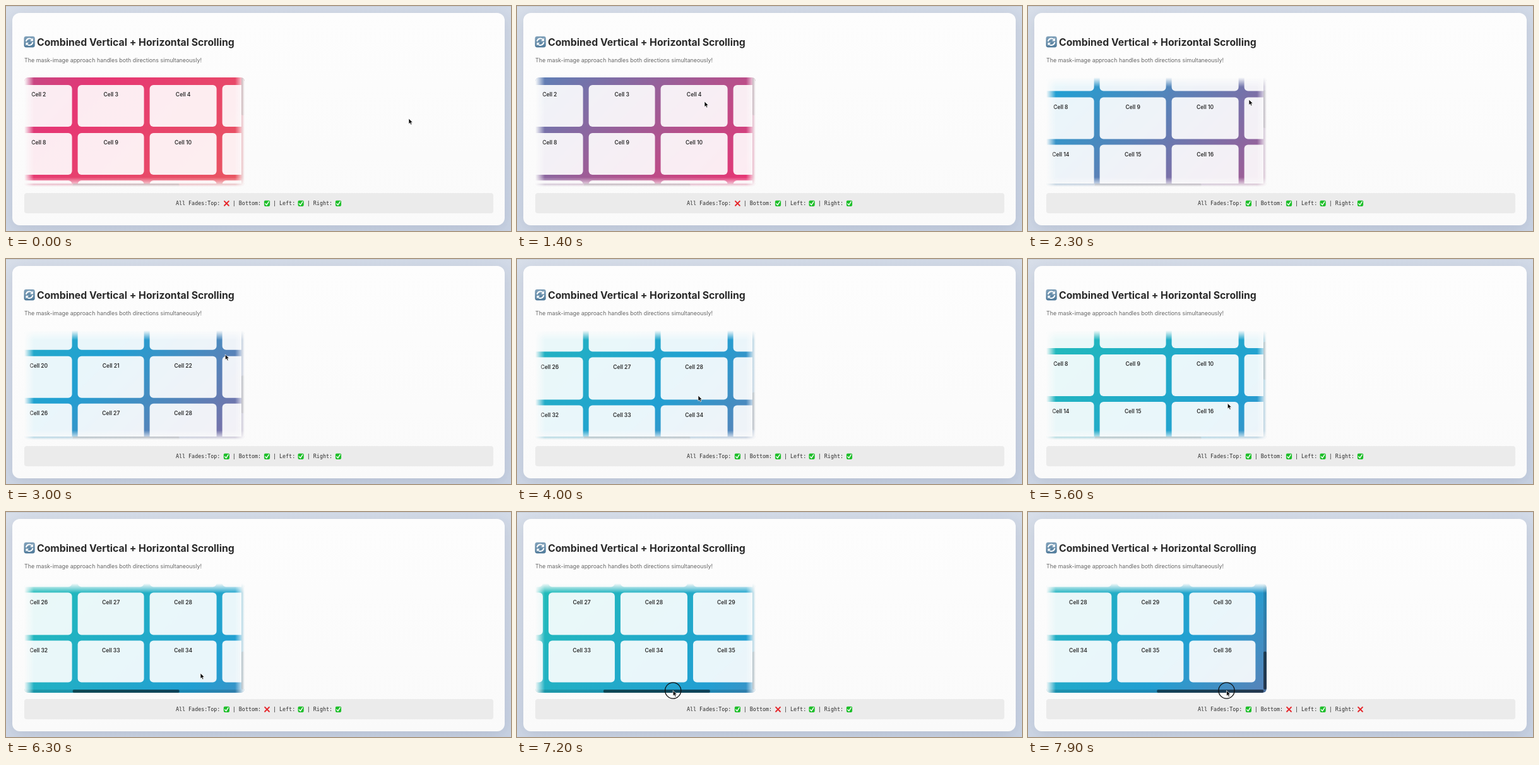
An HTML page for the animation above (8 s loop, 800 px wide and 356 px high).

```html
<!DOCTYPE html>
<html lang="en">
<head>
<meta charset="utf-8">
<title>Combined scrolling</title>
<style>
html, body { margin: 0; width: 100%; height: 100%; overflow: hidden; }
body { background: #d0d8e5; }
#stage {
  position: relative; width: 800px; height: 356px; overflow: hidden;
  background: linear-gradient(165deg, #d8dfea, #c9d3e4);
}
#stage > *, #view * { position: absolute; }
.rule { left: 0; top: 0; width: 800px; height: 1px; background: #c6cdd9; }
.card {
  left: 10px; top: 11px; width: 780px; height: 336px; border-radius: 12px;
  background: linear-gradient(#fdfdfd, #fafafa);
  box-shadow: 0 6px 24px rgba(40, 50, 80, .13);
}
.status {
  left: 28.5px; top: 296.3px; width: 743px; height: 31.7px;
  border-radius: 4px; background: #ebebeb;
}
#view {
  left: 29px; top: 112.5px; width: 349px; height: 173.5px;
  overflow: hidden; border-radius: 6px;
  background: linear-gradient(-45deg, #ec7150, #e63674, #229fd2, #21d0a9);
  background-size: 400% 400%;
  --l: 0; --r: 0; --t: 0; --b: 0;
  -webkit-mask-image:
    linear-gradient(to right, rgba(0,0,0,var(--l)), #000 15px, #000 calc(100% - 15px), rgba(0,0,0,var(--r))),
    linear-gradient(to bottom, rgba(0,0,0,var(--t)), #000 15px, #000 calc(100% - 15px), rgba(0,0,0,var(--b)));
  -webkit-mask-composite: source-in;
  mask-image:
    linear-gradient(to right, rgba(0,0,0,var(--l)), #000 15px, #000 calc(100% - 15px), rgba(0,0,0,var(--r))),
    linear-gradient(to bottom, rgba(0,0,0,var(--t)), #000 15px, #000 calc(100% - 15px), rgba(0,0,0,var(--b)));
  mask-composite: intersect;
}
.port { left: 0; top: 0; width: 344px; height: 168.5px; overflow: hidden; }
#grid { left: 0; top: 0; width: 702px; height: 468px; }
.cell {
  width: 105.3px; height: 66.2px; border-radius: 6px;
  background: rgba(255, 255, 255, .9); color: #2d2d2d;
  font: 600 8.5px/30px Inter, Roboto, sans-serif; text-align: center;
}
.track { background: rgba(0, 0, 0, .14); }
.thumb { background: rgba(0, 0, 0, .5); border-radius: 2px; }
#tx { left: 0; top: 168.5px; width: 349px; height: 5px; }
#ty { left: 344px; top: 0; width: 5px; height: 168.5px; }
#hx { left: 0; top: 168.5px; width: 168.6px; height: 5px; }
#hy { left: 344px; top: 0; width: 5px; height: 60.7px; }
svg { left: 0; top: 0; }
.title { font: 700 15.8px Inter, Roboto, sans-serif; fill: #2a2a2a; }
.sub { font: 400 8.9px Inter, Roboto, sans-serif; fill: #666; }
.mono { font: 8.36px "DejaVu Sans Mono", "Liberation Mono", monospace; fill: #2b2b2b; }
</style>
</head>
<body>
<div id="stage">
  <div class="rule"></div>
  <div class="card"></div>
  <div class="status"></div>
  <div id="view">
    <div class="port"><div id="grid"></div></div>
    <div class="track" id="tx"></div>
    <div class="track" id="ty"></div>
    <div class="thumb" id="hx"></div>
    <div class="thumb" id="hy"></div>
  </div>
  <svg width="800" height="356" viewBox="0 0 800 356">
    <defs>
      <linearGradient id="tile" x2="0" y2="1">
        <stop stop-color="#83a3bb"/><stop offset="1" stop-color="#4d7899"/>
      </linearGradient>
      <g id="yes">
        <rect x=".1" y=".1" width="9.2" height="9.2" rx="1.8" fill="#1fbf2b"/>
        <path d="M2 5.1 4 7.3 7.4 2" fill="none" stroke="#fff" stroke-width="1.4" stroke-linecap="round" stroke-linejoin="round"/>
      </g>
      <path id="no" d="M1.3 1.3 8.1 8.1M8.1 1.3 1.3 8.1" fill="none" stroke="#e6262b" stroke-width="2" stroke-linecap="round"/>
    </defs>
    <g transform="translate(28.5 48)">
      <rect width="17.2" height="17.4" rx="3.4" fill="url(#tile)"/>
      <g fill="none" stroke="#fff" stroke-width="1.9">
        <path d="M3.3 8.2A5.4 5.4 0 0 1 12.3 4.8"/>
        <path d="M13.9 9.2A5.4 5.4 0 0 1 4.9 12.6"/>
      </g>
      <path d="M14.4 2.6V7.4H9.6ZM2.8 14.8V10H7.6Z" fill="#fff"/>
    </g>
    <text class="title" x="49" y="63">Combined Vertical + Horizontal Scrolling</text>
    <text class="sub" x="29" y="89.4">The mask-image approach handles both directions simultaneously!</text>
    <g id="flags"></g>
    <g id="cursor">
      <circle id="ring" r="12.6" cx="0" cy="0" fill="none" stroke="#111" stroke-width="1.3"/>
      <path d="M0 0V8.6L2 6.9 3.4 10 5 9.3 3.6 6.3H6.3Z" fill="#080808" stroke="#fff" stroke-width=".7" stroke-linejoin="round"/>
    </g>
  </svg>
</div>
<script>
const LOOP = 8000, STEP = 100;
const MAX_X = 357.6, MAX_Y = 299.4;
const $ = id => document.getElementById(id);

// Rows of [time, values...]
const scrollY = [[2000, 0], [2300, 56.5], [3500, MAX_Y], [3850, MAX_Y], [4000, 271.5],
  [5100, 47.5], [5300, 0], [5500, 0], [6100, MAX_Y]];
const scrollX = [[6900, 156.4], [7700, MAX_X]];
const pointer = [[100, 638, 178], [1000, 297, 151], [1500, 297, 151], [2100, 350, 148],
  [2900, 350, 148], [3700, 287, 216], [4100, 287, 216], [4800, 320, 216], [5300, 320, 216],
  [6100, 308, 255], [6300, 308, 255], [6800, 216, 282.5], [6900, 216, 282.5], [7700, 314.5, 282.5]];
const press = { from: 6800, to: 8000 };

const linear = u => u;
const smooth = u => u * u * (3 - 2 * u);

function at(rows, t, ease = linear) {
  if (t <= rows[0][0]) return rows[0].slice(1);
  const i = rows.findIndex(r => r[0] > t);
  if (i < 0) return rows[rows.length - 1].slice(1);
  const a = rows[i - 1], b = rows[i];
  const u = ease((t - a[0]) / (b[0] - a[0]));
  return a.slice(1).map((v, k) => v + (b[k + 1] - v) * u);
}

for (let i = 0; i < 36; i++) {
  const cell = document.createElement('div');
  cell.className = 'cell';
  cell.textContent = `Cell ${i + 1}`;
  cell.style.left = 12.2 + 114.4 * (i % 6) + 'px';
  cell.style.top = 12.5 + 75.6 * Math.floor(i / 6) + 'px';
  $('grid').append(cell);
}

function svg(tag, attrs, text = '') {
  const el = document.createElementNS('http://www.w3.org/2000/svg', tag);
  for (const key in attrs) el.setAttribute(key, attrs[key]);
  el.textContent = text;
  $('flags').append(el);
  return el;
}

const flags = [
  ['t', 269, 'All Fades:Top:', 344.7], ['b', 358.8, '| Bottom:', 408.8],
  ['l', 423, '| Left:', 462.4], ['r', 476.8, '| Right:', 521.8],
].map(([side, x, label, iconX]) => {
  svg('text', { class: 'mono', x, y: 315.2 }, label);
  return { side, icon: svg('use', { x: iconX, y: 307.6 }) };
});

const drift = $('view').animate([
  { backgroundPosition: '100% 50%', easing: 'ease' },
  { backgroundPosition: '0% 50%', easing: 'ease' },
  { backgroundPosition: '100% 50%' },
], { duration: 15000, iterations: Infinity });
drift.pause();

function draw(t) {
  const [sx] = at(scrollX, t, smooth), [sy] = at(scrollY, t);
  const [px, py] = at(pointer, t, smooth);
  const fades = { t: sy > 1, b: sy < MAX_Y - 1, l: sx > 1, r: sx < MAX_X - 1 };

  drift.currentTime = 400 + t;
  $('grid').style.transform = `translate(${-sx}px, ${-sy}px)`;
  $('hx').style.transform = `translateX(${sx * 344 / 702}px)`;
  $('hy').style.transform = `translateY(${sy * 168.5 / 468}px)`;
  for (const { side, icon } of flags) {
    $('view').style.setProperty('--' + side, fades[side] ? 0 : 1);
    icon.setAttribute('href', fades[side] ? '#yes' : '#no');
  }
  $('cursor').setAttribute('transform', `translate(${px} ${py})`);
  $('ring').style.display = t >= press.from && t < press.to ? '' : 'none';
}

const start = performance.now();
function tick() {
  const t = (performance.now() - start) % LOOP;
  draw(Math.floor(t / STEP) * STEP);
  requestAnimationFrame(tick);
}
tick();
</script>
</body>
</html>
```
